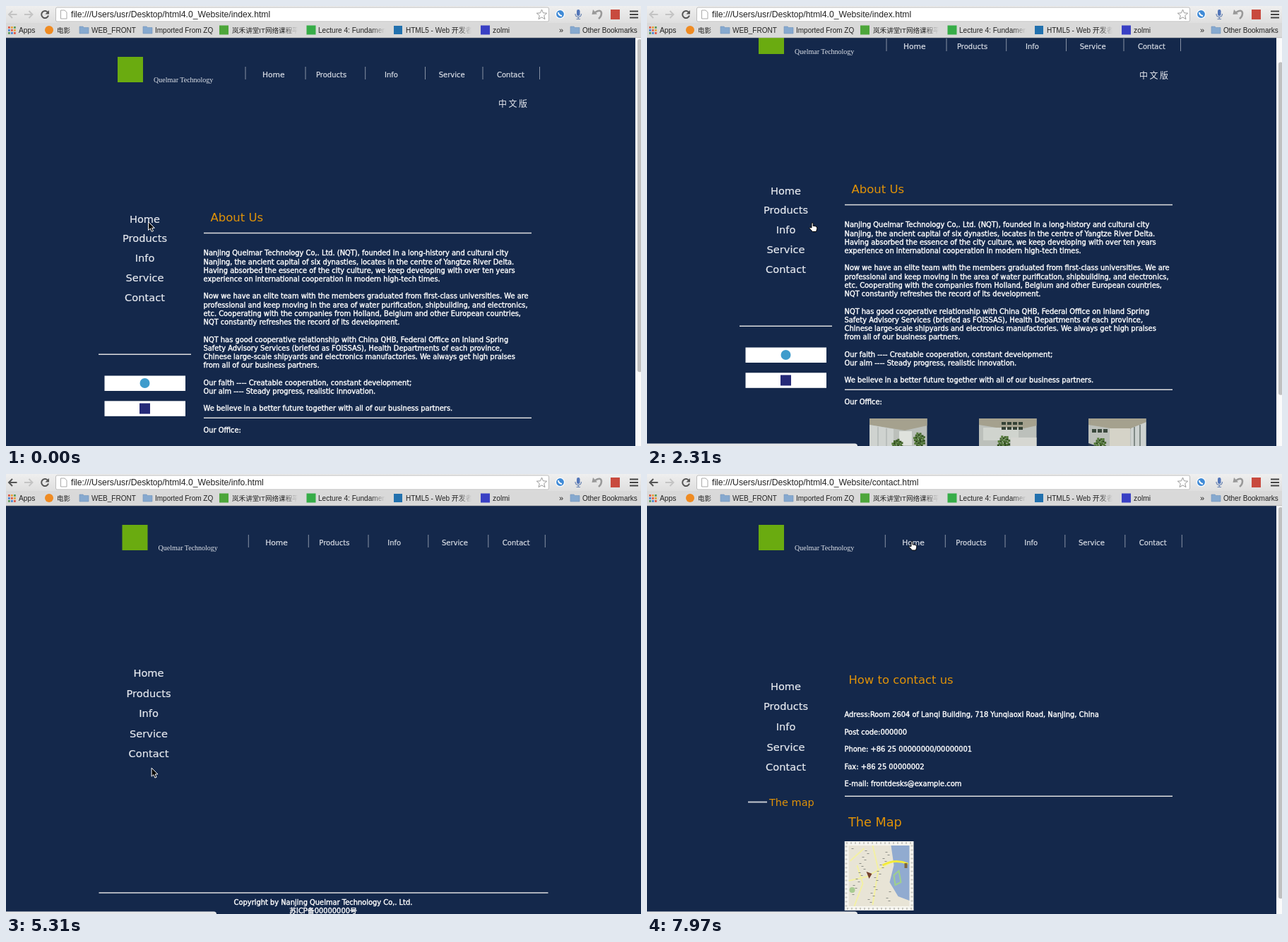
An HTML page for the animation above (8 s loop, 899x623 px).

```html
<!DOCTYPE html>
<html lang="en">
<head>
<meta charset="utf-8">
<title>Browsing a company site</title>
<style>
html, body { margin: 0; width: 100%; height: 100%; overflow: hidden; background: #14284b; }
#stage { display: block; width: 899px; height: 623px; }
text { font-family: "DejaVu Sans", Verdana, sans-serif; white-space: pre; }
.ui { font-family: "Liberation Sans", Arial, "Noto Sans CJK SC", "Noto Sans CJK", sans-serif; }
.serif { font-family: "Liberation Serif", Times, serif; }
.cjk { font-family: "Noto Sans CJK SC", "Noto Sans CJK", sans-serif; letter-spacing: 2.5px; }
.button { font-family: "Open Sans", sans-serif; font-weight: bold; }
.copy { stroke: #fff; stroke-width: .4px; }
.link { stroke: #e6e9ef; stroke-width: .2px; }
</style>
</head>
<body>
<svg id="stage" viewBox="0 0 899 623">
  <defs>
    <linearGradient id="toolbar" x2="0" y2="1"><stop stop-color="#efefef"/><stop offset="1" stop-color="#dedede"/></linearGradient>
    <linearGradient id="fade"><stop stop-color="#d9d9d9" stop-opacity="0"/><stop offset="1" stop-color="#d9d9d9"/></linearGradient>
    <linearGradient id="lime" x2="0" y2="1"><stop stop-color="#b9cc08"/><stop offset=".5" stop-color="#a8bc00"/><stop offset="1" stop-color="#8fa200"/></linearGradient>
    <linearGradient id="divider" x2="0" y2="1"><stop stop-color="#39496a"/><stop offset=".5" stop-color="#6d7788"/><stop offset="1" stop-color="#4d5a73"/></linearGradient>
  </defs>
  <rect width="899" height="623" fill="#14284b"/>
  <g id="page"></g>
  <g id="scrollbar"><rect x="891" y="45" width="8" height="578" fill="#fafafa"/><rect id="thumb" x="894" width="6" rx="3" fill="#c0c0c0"/></g>
  <path id="status" d="M0 619.5H294q4 0 4 3.5H0z" fill="#e6e8ea"/>
  <g id="chrome"></g>
  <g id="cursor">
    <path id="arrow" d="M0 0V12L2.8 9.5 4.8 14 7 13 5 8.8H8.8z" fill="#000" stroke="#fff"/>
    <path id="hand" transform="translate(-2.5 2)" d="M4 8V2.2Q4 .8 5.1 .8T6.2 2.2V5.5q3.5-.2 5 1.2.9 1.2.5 3L10.5 13.5h-5L1 8.8q-.4-1.2.8-1.3z" fill="#fff" stroke="#000"/>
  </g>
</svg>
<script>
const LOOP = 8000, TOP = 46, VIEW = 577;
const ORANGE = '#e09208', PALE = '#e6e9ef', RULE = '#dededf';
const $ = id => document.getElementById(id);

// Drawing helpers; text is placed by the middle of its capitals.
const text = (x, y, s, size = 9.9, fill = '#fff', attrs = '') =>
  `<text x="${x}" y="${y + size * .365}" font-size="${size}" fill="${fill}" ${attrs}>${s}</text>`;
const centered = (x, y, s, size, fill, attrs = '') => text(x, y, s, size, fill, `text-anchor="middle" ${attrs}`);
const rect = (x, y, w, h, fill, attrs = '') => `<rect x="${x}" y="${y}" width="${w}" height="${h}" fill="${fill}" ${attrs}/>`;
const circle = (x, y, r, fill) => `<circle cx="${x}" cy="${y}" r="${r}" fill="${fill}"/>`;
const path = (d, fill, attrs = '') => `<path d="${d}" fill="${fill}" ${attrs}/>`;
const line = (d, color, width = 1.5) => path(d, 'none', `stroke="${color}" stroke-width="${width}"`);
const rule = (x1, x2, y) => line(`M${x1} ${y}H${x2}`, RULE);
const copy = (x, y, s, pitch = 12.22) =>
  s.split('\n').map((row, i) => text(x, y + i * pitch, row, 9.9, '#fff', 'class="copy"')).join('');
const photo = (x, y, w, h, art) => `<svg x="${x}" y="${y}" width="${w}" height="${h}">${art}</svg>`;
const repeat = (n, draw) => Array.from({ length: n }, (_, i) => draw(i)).join('');

const LINKS = ['Home', 'Products', 'Info', 'Service', 'Contact'];

function header(x, navX, [lastBar, endBar] = [339.5, 420]) {
  const bars = [0, 85, 169.7, 254.5, lastBar, endBar];
  const labels = [24, 100, 197, 273.7, lastBar + 20];
  return rect(x + 24, 72, 36, 36, '#6aab10')
    + text(x + 75, 104, 'Quelmar Technology', 10, '#dfe3ea', 'class="serif"')
    + bars.map(b => line(`M${navX + b} 86V104`, '#8791a4', 1)).join('')
    + LINKS.map((s, i) => text(navX + labels[i], i == 4 ? 97.5 : 97, s, i ? 10 : 10.7, '#d6dbe4', 'class="link"')).join('');
}
const menu = (x, y, pitch, links = LINKS) =>
  links.map((s, i) => centered(x, y + i * pitch, s, 14.6, PALE, 'class="link"')).join('');
const footer = (x, y) => rule(x, x + 636, y)
  + `<g text-anchor="middle">${copy(x + 317.5, y + 13.3, 'Copyright by Nanjing Quelmar Technology Co,. Ltd.\n苏ICP备00000000号')}</g>`;

// A scatter of small leaves around (x, y).
const leaves = (n, x, y, rx, ry, colors) => repeat(n, i => {
  const angle = i * 2.4, reach = Math.sqrt((i + .5) / n);
  return rect(x + rx * reach * Math.cos(angle), y + ry * reach * Math.sin(angle), 3, 3, colors[i % colors.length]);
});
const plant = (x, y, r) => leaves(r * 3, x, y, r * .8, r, ['#31501f', '#557c3a', '#47692f'])
  + rect(x - 3, y + r, 7, 6, '#d0d1c8');
const room = art => rect(0, 0, 82, 61, '#bcc0bb') + path('M0 0H82V10L50 17 0 9z', '#a5a18e')
  + path('M0 61V50L40 38 82 48V61z', '#727c89') + art;

const officePhotos = [
  path('M0 9L34 15V44L0 54z', '#cfd3d0') + path('M12 12V51M24 14V48', 'none', 'stroke="#a3aaa8"')
    + rect(42, 18, 18, 20, '#dfe2dd') + plant(38, 37, 9) + plant(69, 29, 10),
  rect(6, 13, 50, 18, '#d0d4ce') + repeat(8, i => rect(32 + i % 4 * 8, 5 + (i >> 2) * 7, 6, 4, '#354236'))
    + rect(45, 27, 37, 20, '#d6d7d2') + path('M0 39H12L20 61H0z', '#253b60') + plant(34, 34, 11),
  rect(30, 14, 29, 26, '#d5d3c8') + path('M60 14L82 5V58L60 43z', '#cdd2d0')
    + line('M65 12V47M73 9V53', '#69736f') + repeat(3, i => rect(5 + i * 8, 15, 6, 5, '#3c4a3f'))
    + path('M0 35L15 40V61H0z', '#27384f') + plant(15, 37, 11)
].map(room);

const index = header(134, 339, [336, 416.5])
  + text(697, 139, '中文版', 12, '#e8eaf0', 'class="cjk"')
  + menu(196.5, 301.3, 27.75) + rule(131, 262, 493.3)
  + rect(139.5, 523.5, 114.5, 21.5, '#fff') + circle(196.5, 534, 7, '#3f9ccc')
  + rect(139.5, 559.3, 114.5, 21.5, '#fff') + rect(189, 562.5, 15, 15, '#252a78')
  + text(289.5, 298.5, 'About Us', 16.5, ORANGE) + rule(280, 744, 321.4)
  + copy(279.5, 349.7, `Nanjing Quelmar Technology Co,. Ltd. (NQT), founded in a long-history and cultural city
Nanjing, the ancient capital of six dynasties, locates in the centre of Yangtze River Delta.
Having absorbed the essence of the city culture, we keep developing with over ten years
experience on international cooperation in modern high-tech times.

Now we have an elite team with the members graduated from first-class universities. We are
professional and keep moving in the area of water purification, shipbuilding, and electronics,
etc. Cooperating with the companies from Holland, Belgium and other European countries,
NQT constantly refreshes the record of its development.

NQT has good cooperative relationship with China QHB, Federal Office on Inland Spring
Safety Advisory Services (briefed as FOISSAS), Health Departments of each province,
Chinese large-scale shipyards and electronics manufactories. We always get high praises
from all of our business partners.

Our faith ---- Creatable cooperation, constant development;
Our aim ---- Steady progress, realistic innovation.

We believe in a better future together with all of our business partners.`)
  + rule(280, 744, 583.2) + copy(279.5, 600, 'Our Office:')
  + officePhotos.map((art, i) => photo(315 + i * 155, 624, 81.5, 61, art)).join('')
  + footer(126, 730);

const columns = [
  { x: 285.5, mid: 363, rule: [285, 438, 309.3], size: 12, button: 325, title: 'WaterPurification', body: `Oruvel purifies bacteriological
contaminated water and
makes it safe and
drinkable.You can use Oruvel
everywhere:it only needs the
sun.

Content:
1.Shortage of clean drinking
water
2.Dirty water is a health
hazard
.....` },
  { x: 445.5, mid: 520.5, rule: [445, 593, 311.4], size: 14.6, button: 480, title: 'ShipBuilding', body: `Having absorbed the essence
of global shipbuilding, we
Nanjing Quelmar Technology
(NQT) have been providing
the best shipbuilding
construction for European
clients for years.
.....` },
  { x: 602, mid: 676, rule: [600, 750, 311.4], size: 14.5, button: 642, title: 'Electronics', body: `With the stable and excellent
business cooperation in
Europe, we converge the
most outstanding electronics
manufactories in China, and
supply our European partners
with the electronic
components and related
products according to their
requirements.
.....` }
];

const wideHeader = header(140.5, 343.3);
const products = wideHeader
  + menu(202, 282, 27.75, LINKS.slice(0, 2)) + menu(202, 424, 27.75, LINKS.slice(2))
  + line('M166 343H144.5V391.5H166M144.5 367H166', '#b9bec8')
  + columns.map((c, i) => text(166.5, [344, 367, 391.5][i], c.title, 11.3, ORANGE)
    + centered(c.mid, 292, c.title, c.size, ORANGE) + rule(...c.rule) + copy(c.x, 330, c.body)
    + rect(c.button, 541, 68.5, 20, 'url(#lime)', 'rx="2"')
    + centered(c.button + 34, 551.2, 'SEE MORE', 8.5, '#1f2a08', 'class="button"')).join('')
  + rect(439, 323, 3, 213, 'url(#divider)') + rect(596, 323, 3, 213, 'url(#divider)')
  + footer(131.5, 589.5);

const info = wideHeader + menu(202, 282, 28.5) + footer(131.5, 593);

const notebooks = rect(0, 0, 81, 114, '#a98d60') + path('M0 22L30 50 81 26V66L0 60z', '#565d88')
  + path('M0 72L30 66 81 74V114H0z', '#495283') + path('M38 66L81 60V92L46 106z', '#a98b5a')
  + leaves(24, 40, 60, 38, 52, ['#5d6a50', '#c3a972', '#3d4674'])
  + repeat(6, i => line(`M${30 + i * 4} 62L${-8 + i * 18} ${i % 2 ? 0 : 12}`, '#c9c6ba', 3.5))
  + repeat(4, i => line(`M40 54L${-4 + i * 28} ${i % 3 ? 114 : 92}`, '#cfccc1', 4.5));
const certificate = rect(0, 0, 82, 114, '#f0dccb') + circle(48, 58, 35, '#e2c5b0')
  + rect(2.5, 2.5, 77, 109, 'none', 'stroke="#cf9c80" stroke-dasharray="2 1"')
  + path('M0 114L4 92 22 76 58 98 36 100 50 114z', '#fff2e5')
  + centered(39, 14, 'CERTIFICATE', 4.3, '#3b302c') + centered(39, 24, 'VERDANT ORB', 6.2, '#dc6a3c', 'font-weight="bold"')
  + rect(32, 40, 15, 4, '#4a94bd') + centered(40, 53, '2nd Prize', 4.2, '#b5483a')
  + rect(30, 59, 20, 1, '#9c7767') + rect(34, 67, 12, 1, '#9c7767')
  + circle(15, 86, 11.5, '#6b5440') + circle(14, 84, 8, '#a58e70') + circle(12, 82, 4, '#d9c8ac')
  + rect(16, 102, 16, 3, '#4b6f8f');
const machine = rect(0, 0, 82, 114, '#555c35') + path('M0 0H34L22 40 34 70 0 88z', '#2b3020')
  + path('M48 34L82 18V80L56 82z', '#6f7541')
  + leaves(90, 40, 48, 46, 50, ['#3b4428', '#7d8349', '#2a301e', '#656b3e'])
  + path('M0 98L18 92 40 100 60 91 82 97V114H0z', '#7d7763')
  + repeat(6, i => circle(6 + i * 14, 103 + i % 2 * 5, 5, '#a29a84'))
  + rect(39, 28, 2, 28, '#c8ccd2') + rect(15, 10, 51, 19, '#26386c', 'stroke="#a9b4c8"')
  + repeat(3, i => line(`M17 ${15 + i * 5}H64`, '#465888', .7))
  + rect(36, 54, 20, 53, '#2d529a') + rect(40, 58, 12, 10, '#7f9ac6') + rect(42, 72, 10, 15, '#142035') + rect(37, 89, 18, 5, '#6b8fc6');

const service = wideHeader + menu(202, 282, 28.5)
  + text(293, 291, 'Our Service', 16.4, ORANGE)
  + copy(285.5, 327.5, 'Oruvel Equipment Servicing Centre in China has been set up at the same time.')
  + rule(285, 750, 377.5)
  + photo(285.5, 404.5, 81, 114, notebooks) + photo(435, 404.5, 81.5, 114, certificate) + photo(593, 404.5, 81.5, 114, machine)
  + footer(131.5, 593);

const cityMap = rect(0, 0, 98, 98, '#f6f5ef')
  + rect(2.5, 2.5, 93, 93, 'none', 'stroke="#c9c8c2" stroke-width="3" stroke-dasharray="2 4"')
  + rect(6, 6, 86, 86, '#e8e4d6') + path('M66 6H92V84L76 78 64 58 70 34z', '#91abd0')
  + line('M8 28L28 10M14 92L26 60 18 34M6 56L32 50 66 30M40 6L48 40 40 90', '#f3f0a4', 2)
  + line('M54 34Q72 24 90 32', '#f4ec3a', 3) + path('M70 48L77 42 80 58 72 62z', 'none', 'stroke="#9fd08b" stroke-width="2"')
  + repeat(34, i => rect(10 + i * 17 % 55, 10 + i * 29 % 78, 3, 1, '#8b8d86'))
  + path('M31 43L39 46 35 53z', '#75402c') + rect(85, 31, 4, 7, '#7d6540') + circle(11, 69, 4, '#a8cb91');

const contact = header(134, 337.3)
  + menu(196.5, 300.6, 28.55) + line('M143 464.5H170', '#c4c8d0', 2) + text(173, 464.5, 'The map', 14.5, ORANGE)
  + text(285.5, 291, 'How to contact us', 16.4, ORANGE)
  + copy(279.5, 340.5, `Adress:Room 2604 of Lanqi Building, 718 Yunqiaoxi Road, NanJing, China
Post code:000000
Phone: +86 25 00000000/00000001
Fax: +86 25 00000002
E-mail: frontdesks@example.com`, 24.55)
  + rule(280, 744, 456.2) + text(285, 492.5, 'The Map', 17.7, ORANGE)
  + photo(279.5, 520, 98.5, 98, cityMap) + footer(126, 624.5);

const pages = {
  index: { art: index, height: 711 },
  products: { art: products, height: VIEW },
  info: { art: info, height: VIEW },
  service: { art: service, height: VIEW },
  contact: { art: contact, height: 604 }
};

const label = (x, s, size = 10) => text(x, 34.3, s, size, '#222', 'class="ui"');
const folder = x => path(`M${x} 29h5l1.5 1.5H${x + 13}V39H${x}z`, '#86a9cf', 'stroke="#6f93ba" stroke-width=".6"');
const fadeOut = x => rect(x - 20, 26, 20, 17, 'url(#fade)') + rect(x, 26, 8, 17, '#d9d9d9');
const chevron = (id, d) => `<path id="${id}" d="${d}" fill="none" stroke="#c4c4c4" stroke-width="2"/>`;

$('chrome').innerHTML = rect(0, 0, 899, 25, 'url(#toolbar)') + rect(0, 24, 899, 21, '#d9d9d9') + rect(0, 44.5, 899, .7, '#b4b4b4')
  + rect(70.5, 2, 698, 20, '#fff', 'rx="2" stroke="#bcbcbc"')
  + chevron('back', 'M15.5 12H4M9 7L4 12 9 17') + chevron('forward', 'M26 12H37.5M32.5 7L37.5 12 32.5 17')
  + line('M59.5 9.5A5 5 0 1 0 60 13.5', '#555', 2) + path('M61 6V11.5H55.5z', '#555')
  + path('M77.5 6H83L86 9V18H77.5z', '#fff', 'stroke="#aaa"')
  + '<text id="url" class="ui" x="92" y="16.3" font-size="12.2" fill="#222"></text>'
  + path('M758.5 5l2 4.8 5.2.4-4 3.4 1.3 5-4.5-2.7-4.5 2.7 1.3-5-4-3.4 5.2-.4z', '#fff', 'stroke="#999"')
  + `<g id="phone">${circle(784.5, 11.5, 6.8, '#f7f9fb')}${circle(784.5, 11.5, 5.4, '#3f8ad6')}${line('M782 9Q782 13 787 14', '#fff', 2)}</g>`
  + `<g id="badge">${circle(783.5, 11.5, 6, '#f7f9fb')}${line('M785 9L791 14', '#8aa9c6', 2)}${rect(783, 14, 13, 9, '#2d6cb9', 'rx="1"')}</g>`
  + rect(808, 5, 4.5, 9, '#5275b8', 'rx="2.2"') + line('M806 11Q806 15.5 810.2 15.5T814.5 11M810.2 15V18.5M807.5 18.5H813', '#6984b2', 1.2)
  + line('M834 9Q842 4 843 10 843 15 839 18', '#999', 2.6) + path('M829.5 12L831 5 837 11.5z', '#999')
  + rect(856, 5, 13, 14, '#c84a3e') + line('M883 7.5H895M883 12H895M883 16.5H895', '#444', 2)
  + repeat(9, i => rect(3 + i % 3 * 4, 29 + (i / 3 | 0) * 4, 2.8, 2.8, ['#e05745', '#e8a23a', '#5a9b59', '#4a83cf'][i % 4]))
  + label(18, 'Apps', 10.3) + circle(61, 34, 6, '#ef8b22') + label(72, '电影', 9.5)
  + folder(104) + label(121, 'WEB_FRONT') + folder(194) + label(211, 'Imported From ZQ')
  + rect(302, 27.5, 13, 13, '#4da63b') + label(320, '岚禾讲堂IT网络课程平', 9.6) + fadeOut(413)
  + rect(425.5, 27.5, 13, 13, '#36ad48') + label(442, 'Lecture 4: Fundamen', 10.1) + fadeOut(537)
  + rect(549, 28, 12, 12, '#2271ae') + label(566, 'HTML5 - Web 开发者') + fadeOut(659)
  + rect(672, 27.5, 13, 13, '#3940c4') + label(689, 'zolmi', 10.3)
  + label(783, '»', 11) + folder(799) + label(816, 'Other Bookmarks');

// Hard changes: [time, value].
const visits = [[0, 'index'], [3650, 'products'], [5310, 'info'], [5900, 'service'], [6490, 'contact']];
const scrolls = [[0, 0], [1360, 23], [1510, 58], [1680, 34], [1840, 0], [2310, 40], [2460, 98], [2600, 134],
  [3650, 0], [6940, 14], [7090, 27], [7380, 12], [7530, 0]];
const handTimes = [[300, 2600], [3200, 5310], [5600, 5900], [6190, 6640], [7820, LOOP]];
const statusTimes = [[300, 1040], [1840, 2900], [3350, 6640], [7820, LOOP]];
const badgeTimes = [[1040, 1840]];

// Cursor moves run in discrete steps, the first at `start` and the last at `end`.
const moves = [
  { start: 150, end: 1190, steps: 8, to: [231.5, 304], bend: 24 },
  { start: 2900, end: 3350, steps: 4, to: [205, 194] },
  { start: 3650, end: 4110, steps: 4, to: [205.5, 343.5] },
  { start: 4710, end: 5010, steps: 3, to: [205, 425.5] },
  { start: 5310, end: 5750, steps: 4, to: [212, 366] },
  { start: 5900, end: 6050, steps: 2, to: [219, 419] },
  { start: 6190, end: 6340, steps: 2, to: [206, 396] },
  { start: 6640, end: 7530, steps: 7, to: [215, 464] },
  { start: 7670, end: 7970, steps: 3, to: [372.5, 92.5], bend: -125 }
];

const latest = (list, t) => list.filter(([time]) => time <= t).pop()[1];
const during = (spans, t) => spans.some(([a, b]) => t >= a && t < b);
const show = (id, on) => { $(id).style.display = on ? '' : 'none'; };

function cursorAt(t) {
  let x = 201.5, y = 305.5;
  for (const { start, end, steps, to, bend = 0 } of moves) {
    if (t < start) break;
    const step = Math.floor((t - start) / (end - start) * (steps - 1) + 1e-6) + 1;
    const p = Math.min(1, step / steps), eased = p * p * (3 - 2 * p);
    x += (to[0] - x) * eased;
    y += (to[1] - y) * eased + bend * Math.sin(Math.PI * p);
  }
  return [x, y];
}

let shown;
function render(t) {
  const name = latest(visits, t), { art, height } = pages[name], scroll = latest(scrolls, t);
  if (name !== shown) {
    shown = name;
    $('page').innerHTML = art;
    $('url').textContent = `file:///Users/usr/Desktop/html4.0_Website/${name}.html`;
    $('back').setAttribute('stroke', name === 'index' ? '#c4c4c4' : '#555');
    show('scrollbar', height > VIEW);
  }
  $('page').setAttribute('transform', `translate(0 ${-scroll})`);
  $('thumb').setAttribute('y', TOP + 1 + scroll * VIEW / height);
  $('thumb').setAttribute('height', VIEW * VIEW / height + 3);
  $('cursor').setAttribute('transform', `translate(${cursorAt(t)})`);
  const hand = during(handTimes, t), badge = during(badgeTimes, t);
  show('hand', hand);
  show('arrow', !hand);
  show('badge', badge);
  show('phone', !badge);
  show('status', during(statusTimes, t));
}

const begin = performance.now();
function frame() {
  render((performance.now() - begin) % LOOP);
  requestAnimationFrame(frame);
}
frame();
</script>
</body>
</html>
```
